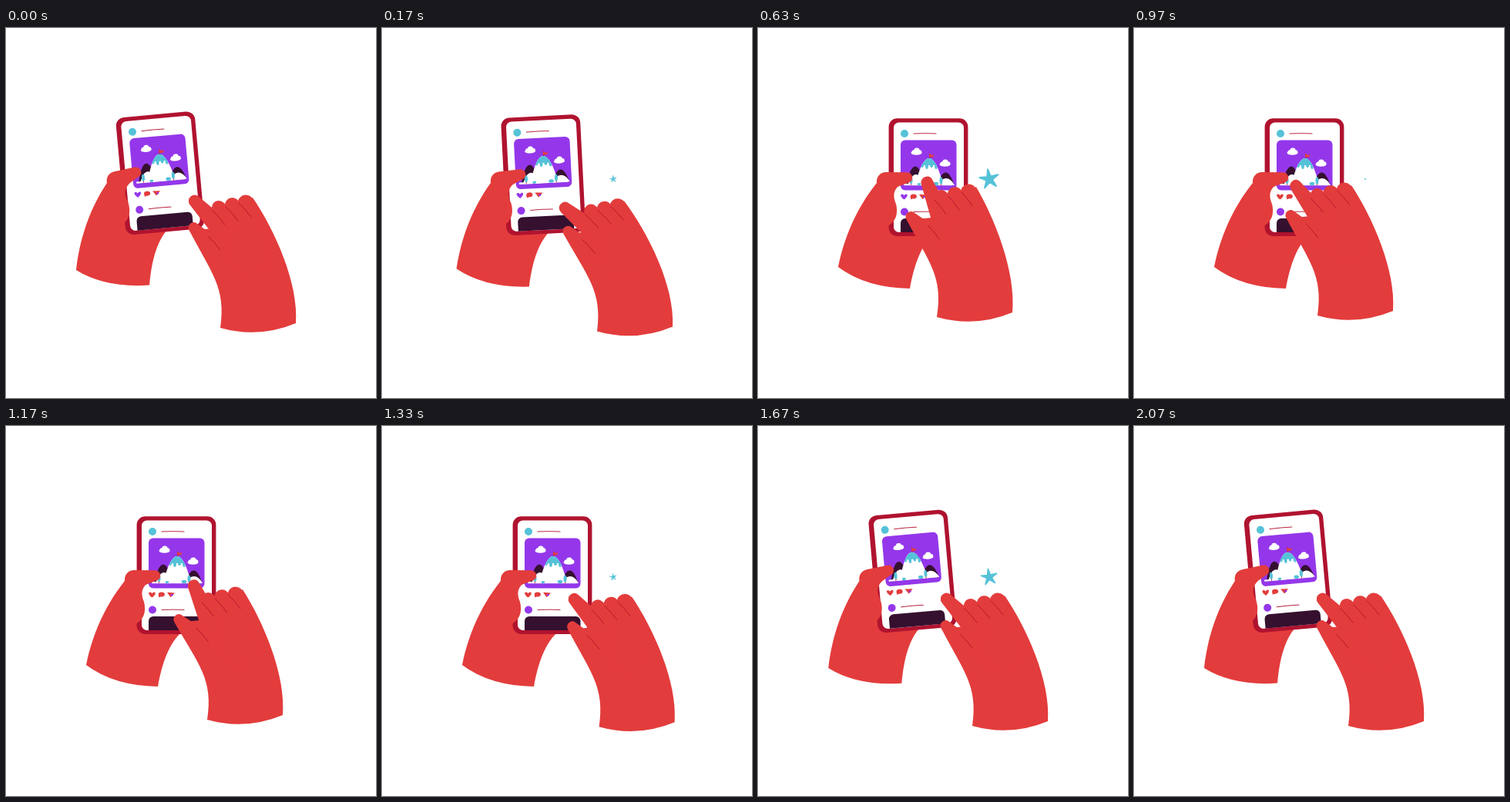
An HTML page with a canvas that plays this animation: 480 by 480 pixels, repeating every 2130 ms.

```html
<!DOCTYPE html>
<html lang="en">
<head>
<meta charset="utf-8">
<title>Phone in hands</title>
<style>
html, body { margin: 0; width: 100%; height: 100%; overflow: hidden; background: #fff; }
canvas { display: block; width: 100vw; height: 100vh; object-fit: contain; }
</style>
</head>
<body>
<canvas id="stage" width="480" height="480"></canvas>
<script>
const ctx = document.getElementById('stage').getContext('2d');
const LOOP = 2130, TAU = Math.PI * 2, DEG = Math.PI / 180;
const RED = '#e33c3c', CRIMSON = '#b0132f', PURPLE = '#9437ea',
      TEAL = '#55c2d8', DARK = '#35102f', WHITE = '#fff';

const lerp = (a, b, k) => a + (b - a) * k;
const smooth = (t, from, to) => {
  const k = Math.min(1, Math.max(0, (t - from) / (to - from)));
  return k * k * (3 - 2 * k);
};

function fill(color, path) {
  ctx.fillStyle = color;
  path ? ctx.fill(new Path2D(path)) : ctx.fill();
}

function blob(x, y, rx, ry, color) {
  ctx.beginPath();
  ctx.ellipse(x, y, rx, ry, 0, 0, TAU);
  fill(color);
}

function box(x, y, w, h, r, color) {
  ctx.beginPath();
  ctx.roundRect(x, y, w, h, r);
  fill(color);
}

function line(x1, y1, x2, y2) {
  ctx.beginPath();
  ctx.moveTo(x1, y1);
  ctx.quadraticCurveTo((x1 + x2) / 2 + 0.7, (y1 + y2) / 2 - 0.7, x2, y2);
  ctx.strokeStyle = CRIMSON;
  ctx.lineWidth = 0.9;
  ctx.stroke();
}

// Hull of a small tip circle and a larger base circle
function finger(x1, y1, r1, x2, y2, r2) {
  const a = Math.atan2(y2 - y1, x2 - x1);
  const b = Math.acos((r1 - r2) / Math.hypot(x2 - x1, y2 - y1));
  ctx.beginPath();
  ctx.arc(x1, y1, r1, a + b, a - b + TAU);
  ctx.arc(x2, y2, r2, a - b, a + b);
  fill(RED);
}

function cloud(x, y) {
  blob(x, y + 2, 7, 2.7, WHITE);
  for (const i of [-1, 0, 1]) blob(x + 0.5 + 3.8 * i, y + 2 * Math.abs(i) - 1.2, 3.6 - Math.abs(i), 3.2 - Math.abs(i) * 0.7, WHITE);
}

function tree(x, y) {
  line(x, y, x, y + 6);
  blob(x, y, 2, 4.5, TEAL);
}

// Bell-shaped hill standing on the ground line
function hill(x, top, half, color) {
  const ground = 204, lift = (4 * top - ground) / 3;
  ctx.beginPath();
  ctx.moveTo(x - half, ground);
  ctx.bezierCurveTo(x - half * 0.4, lift, x + half * 0.4, lift, x + half, ground);
  fill(color);
}

function picture() {
  box(185, 145.5, 72.5, 65, 6, PURPLE);
  cloud(205.5, 160);
  cloud(242.5, 175);
  hill(204, 179.5, 12, DARK);
  hill(205, 190, 11, WHITE);
  hill(243.5, 187.5, 11, DARK);
  hill(244, 195, 11, WHITE);
  line(222.5, 171, 222.5, 163);
  fill(RED, 'M222,163 L226,165 229,164 227,167.5 222,167.5Z');
  ctx.save();
  hill(222, 169, 18, WHITE);
  ctx.clip();
  box(205, 165, 34, 13, 0, TEAL);
  for (let i = 0; i < 4; i++) blob(213 + 6 * i, 178, 2, i % 2 ? 5 : 3, TEAL);
  ctx.restore();
  box(189, 202, 64, 2.3, 1, WHITE);
  blob(209, 202.6, 2.5, 1.7, TEAL);
  blob(231, 202, 3.3, 2.2, TEAL);
  tree(198.5, 197.5);
  tree(237.5, 198);
}

// Moves between the tilted and the upright hold
function hold(up) {
  ctx.translate(lerp(200, 221, up), lerp(188.2, 193.5, up));
  ctx.rotate(-5.2 * (1 - up) * DEG);
  ctx.translate(-221, -193.5);
}

function phone(liked) {
  box(169.6, 117.2, 102.8, 152.8, 11, CRIMSON);
  box(176, 122.5, 91, 142.5, 7, WHITE);
  picture();
  fill(liked ? RED : PURPLE, 'M189.5,222.5 C182,217 186,213 189.5,217 C193,213 197,217 189.5,222.5Z');
  blob(201.8, 218.4, 4.1, 3, RED);
  fill(RED, 'M198,219 L198.3,222.4 201,221Z M209,215.8 L219,216.4 213.5,222.3Z');
  blob(215.4, 219.3, 1.6, 1.3, PURPLE);
  for (const [y, color] of [[137, TEAL], [238.5, PURPLE]]) {
    blob(190, y, 5, 5, color);
    line(202, y, 231, y);
  }
  box(185, 247, 72.5, 18, [6, 6, 0, 0], DARK);
}

function leftPalm() {
  fill(RED, 'M104,310 L166,188 228,267 C212,282 203,305 197,338 Q140,337 104,310Z');
}

function leftGrip(up) {
  fill(RED, 'M104,310 C114,262 134,222 166,187 L190,200 C174,208 175,218 179,228 C182,240 179,250 171,255Z');
  ctx.translate(166, 199);
  ctx.rotate(-7 * (1 - up) * DEG);
  finger(27.5, -5, 6.8, 0, 0, 12);
}

// Right hand: time, wrist x, wrist y, lean, index lift
const keys = [
  [0, 278, 389, 0, 0],
  [330, 274, 396, -12, -0.5],
  [630, 232, 375, 9, 1],
  [740, 227, 350, 10, 1.8],
  [860, 232, 376, 1, -0.8],
  [970, 238, 373, 2, 0.3],
  [1170, 261, 381, 4, 0.9],
  [1350, 283, 391, 0, 0],
  [1480, 278, 389, 0, 0]
];

function poseAt(t) {
  const end = keys.length - 1;
  if (t >= keys[end][0]) return keys[end].slice(1);
  const i = keys.findIndex(k => k[0] > t) - 1;
  const a = keys[i], b = keys[i + 1], span = b[0] - a[0], u = (t - a[0]) / span;
  const slope = (n, c) => n === 0 || n === end ? 0
    : (keys[n + 1][c] - keys[n - 1][c]) / (keys[n + 1][0] - keys[n - 1][0]);
  return [1, 2, 3, 4].map(c => lerp(a[c], b[c], smooth(u, 0, 1))
    + span * u * (1 - u) * ((1 - u) * slope(i, c) - u * slope(i + 1, c)));
}

function rightHand(t) {
  const [x, y, lean, lift] = poseAt(t);
  const bend = (px, py) => [px + lean * (py / 170) ** 2, py];
  const crease = (px, py) => line(...bend(px, py), ...bend(px + 16, py + 18));
  const thumb = -34.5 + lean * 0.76 - 6 * lift;
  const angle = (46 + 22 * lift) * DEG, base = bend(0, -130);
  ctx.save();
  ctx.translate(x, y);

  ctx.beginPath();
  ctx.moveTo(0, 0);
  ctx.bezierCurveTo(...bend(8, -52), ...bend(-12, -72), thumb - 5.5, -126);
  ctx.lineTo(...base);
  ctx.lineTo(...bend(42, -169));
  ctx.bezierCurveTo(...bend(70, -128), ...bend(102, -58), 98, -6);
  ctx.quadraticCurveTo(50, 14, 0, 0);
  fill(RED);

  for (let i = 0; i < 3; i++)
    finger(...bend(-2 + 17.5 * i, -156 - 3 * i), 9 + 0.7 * i, ...bend(38, -95), 25);
  finger(thumb, -130, 6.8, ...bend(-8, -104), 12);
  finger(base[0] - 48 * Math.cos(angle), base[1] - 48 * Math.sin(angle), 7.8, ...base, 13);

  for (let i = 0; i < 3; i++) crease(-10 + 17 * i, -152 - 5 * i);
  crease(-16, -119);
  ctx.restore();
}

function star(t) {
  const r = t < 1100
    ? 14 * smooth(t, 0, 430) * (1 - smooth(t, 600, 1070))
    : 12 * smooth(t, 1120, 1600) * (1 - smooth(t, 1620, 2070));
  if (r < 0.1) return;
  ctx.beginPath();
  for (let i = 0; i < 10; i++) {
    const a = -0.15 - Math.PI / 2 + i * Math.PI / 5, d = r * (i % 2 ? 0.28 : 0.92);
    ctx.lineTo(300 + d * Math.cos(a), 196 + d * Math.sin(a));
  }
  ctx.closePath();
  ctx.strokeStyle = TEAL;
  ctx.lineJoin = 'round';
  ctx.lineWidth = r * 0.15;
  fill(TEAL);
  ctx.stroke();
}

function draw(now) {
  const t = now % LOOP;
  const up = smooth(t, 0, 370) - smooth(t, 1345, 1705);
  const slip = up - 1;
  ctx.fillStyle = WHITE;
  ctx.fillRect(0, 0, 480, 480);
  ctx.lineCap = 'round';
  ctx.save();
  hold(up);
  ctx.translate(3 * slip, slip);
  leftPalm();
  ctx.translate(-3 * slip, -slip);
  phone(t >= 860);
  ctx.translate(3 * slip, slip);
  leftGrip(up);
  ctx.restore();
  star(t);
  rightHand(t);
}

let start;
function tick(now) {
  start ??= now;
  draw(now - start);
  requestAnimationFrame(tick);
}
draw(0);
requestAnimationFrame(tick);
</script>
</body>
</html>
```
